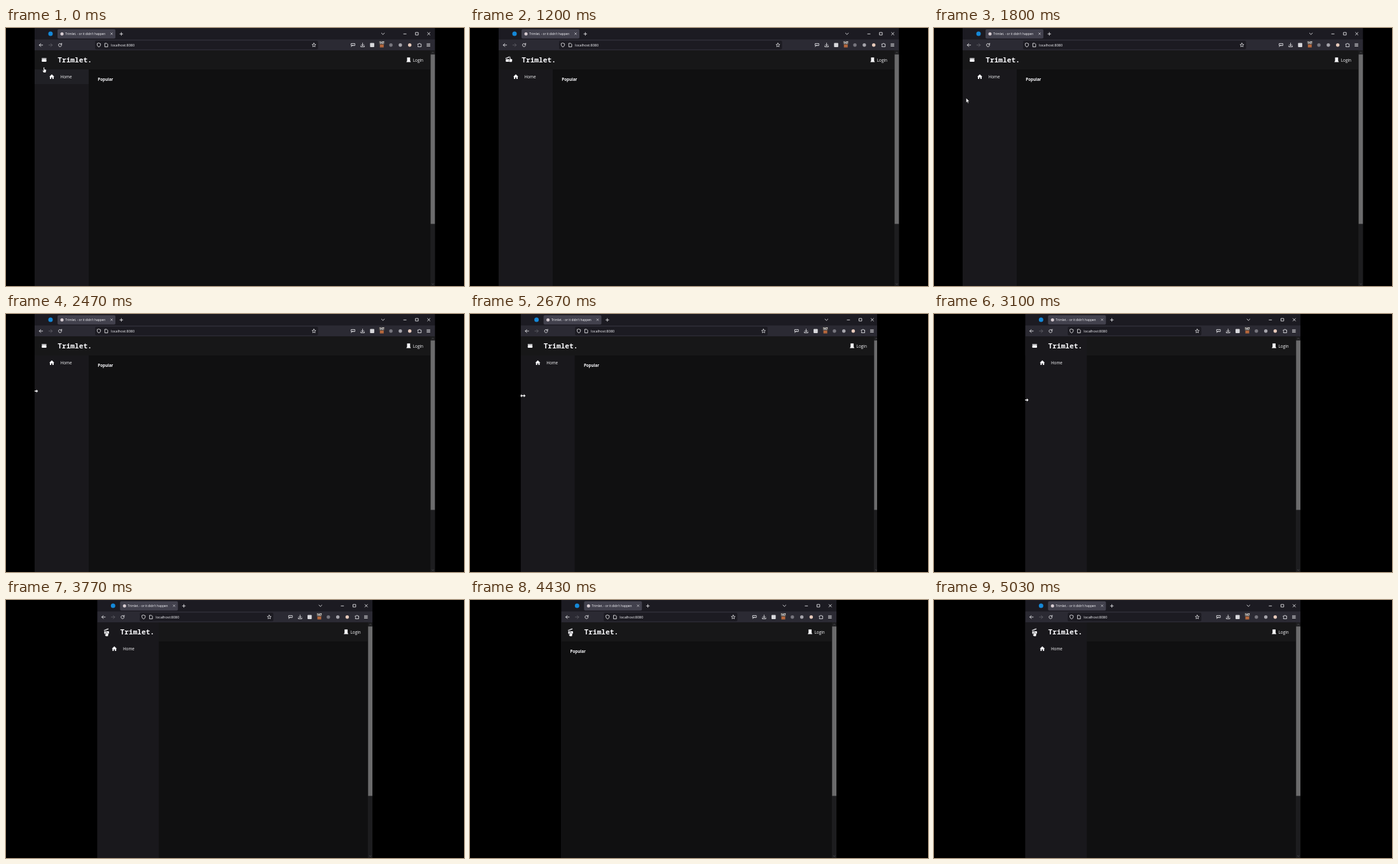
An HTML page with a canvas for the animation above (5.06 s loop, 720x405 px).

```html
<!DOCTYPE html>
<html lang="en">
<head>
<meta charset="utf-8">
<title>Sidebar demo</title>
<style>
  html, body { margin: 0; width: 100%; height: 100%; overflow: hidden; background: #000; }
  canvas { display: block; }
</style>
</head>
<body>
<canvas id="stage" width="720" height="405"></canvas>
<script>
const c = document.getElementById('stage').getContext('2d');
const LOOP = 5060, NAME = 'Trimlet.';
const SANS = '"Open Sans", "Noto Sans", sans-serif';
const MONO = '"Noto Sans Mono", "DejaVu Sans Mono", monospace';
const WHITE = '#fbfbfe';

// Progress 0..1 between two times, and a rise followed by a fall
const ramp = (t, from, to) => Math.min(1, Math.max(0, (t - from) / (to - from)));
const ease = (t, from, to) => { const p = ramp(t, from, to); return p * p * (3 - 2 * p); };
const pulse = (t, up, down, length) => ease(t, up, up + length) - ease(t, down, down + length);

function rect(x, y, w, h, fill, r = 0) {
  c.fillStyle = fill;
  c.beginPath();
  c.roundRect(x, y, w, h, r);
  c.fill();
}
function dot(x, y, r, fill) {
  rect(x - r, y - r, 2 * r, 2 * r, fill, r);
}
function text(s, x, y, size, weight = 400, family = SANS) {
  c.font = `${weight} ${size}px ${family}`;
  c.fillStyle = WHITE;
  c.fillText(s, x, y);
}
// SVG path placed at x, y; filled as well when fill is set
function icon(d, x, y, { stroke = WHITE, width = .8, fill, scale = 1 } = {}) {
  c.save();
  c.translate(x, y);
  c.scale(scale, Math.abs(scale));
  const p = new Path2D(d);
  if (fill) { c.fillStyle = fill; c.fill(p); }
  if (stroke) {
    c.strokeStyle = stroke;
    c.lineWidth = width;
    c.lineCap = c.lineJoin = 'round';
    c.stroke(p);
  }
  c.restore();
}
const ARROW = 'M2.7 0H-2.7M-.3-2.4L-2.7 0L-.3 2.4';
const CROSS = 'M-2-2L2 2M2-2L-2 2';
const CHEVRON = 'M-2.3-1L0 1.2L2.3-1';
const STAR = 'M' + Array.from({ length: 10 }, (_, i) => {
  const a = i * Math.PI / 5, r = i % 2 ? 1.5 : 3.2;
  return `${r * Math.sin(a)} ${-r * Math.cos(a)}`;
}).join('L') + 'Z';

function browser(L, R) {
  const W = R - L;
  rect(L, 0, W, 18, '#1c1b22');
  rect(L, 18, W, 17, '#2b2a33');

  dot(L + 25, 9, 3.5, '#1488d8');
  rect(L + 36, 2, 91, 14.5, '#42414d', 2);
  dot(L + 43, 9.2, 2.5, '#d8cdd2');
  text(NAME + " - or it didn't happen", L + 48.3, 11, 4.85);
  icon(CROSS, L + 121, 9, { scale: .7 });
  icon('M-2.3 0H2.3M0-2.3V2.3', L + 136.3, 9.3);
  icon(CHEVRON, R - 82, 9);
  icon('M-2 0H2', R - 47.5, 9.3);
  icon('M-2-2H2V2H-2Z', R - 28.5, 9);
  icon(CROSS, R - 10, 9);

  icon(ARROW, L + 10, 26.8);
  icon(ARROW, L + 25, 26.8, { stroke: '#66656d', scale: -1 });
  icon('M2.2-1.2A2.5 2.5 0 1 0 2.5.4M2.6-2.8V-.9H.7', L + 40, 26.8);

  // The address bar keeps flexible gaps on both sides
  const gap = (W - 629.5) * .1425;
  const a = L + 95 + gap, b = R - 184 - gap;
  rect(a, 20, b - a, 13.5, '#1c1b22', 2);
  icon('M0-3L2.6-2V0Q2.3 2.2 0 3.1Q-2.3 2.2-2.6 0V-2Z', a + 6, 26.7);
  icon('M-2-2.8H.6L2.2-1.2V2.8H-2Z', a + 17.7, 26.8);
  text('localhost:8080', a + 25, 28.8, 5.5);
  icon(STAR, b - 6.5, 26.9, { width: .7 });

  icon('M-2.6-2.2H2.8V1H-2.6ZM-3 2.6L0-.2', R - 129, 26.6);
  icon('M0-3V1.2M-1.9-.5L0 1.4L1.9-.5M-2.8 1.4V2.9H2.8V1.4', R - 114, 26.6);
  rect(R - 102.3, 23.5, 6.6, 6.6, '#d8d8dc', 1);
  rect(R - 86.8, 25.5, 6, 5, '#b5673c');
  rect(R - 88.2, 20.5, 8.8, 5.3, '#4b4745', .8);
  text('147', R - 87.5, 24.8, 4.3, 700);
  ['#77767e', '#a5a4ab', '#e6c9ba'].forEach((fill, i) => dot(R - 69.5 + 14.8 * i, 26.8, 2.7, fill));
  icon('M-2.5-1.5H-1A1 1 0 0 1 1-1.5H2.6V2.8H-2.5V1.3A.8.8 0 0 0-2.5-.1Z', R - 24.5, 26.6);
  for (const y of [-1.9, 0, 1.9]) icon('M-2.4 0H2.4', R - 10.5, 26.7 + y);
}

function clapper(x, y, open) {
  rect(x - 3.7, y - .9, 7.4, 3.9, WHITE, .8);
  c.save();
  c.translate(x - 3.6, y - 1.2);
  c.rotate(-.38 * open);
  rect(0, -1.8, 7.3, 1.7, WHITE, .5);
  for (let i = 0; i < 3; i++) icon('M.6 0L0 1.5', 1.4 + 2.2 * i, -1.7, { stroke: '#19181c', width: .5 });
  c.restore();
}

function page(t, L, R, onIcon, onHome) {
  const W = R - L;
  // A narrow window turns the sidebar into an overlay that slides away
  const overlay = t >= 2755;
  const hidden = overlay ? pulse(t, 3880, 4420, 250) : pulse(t, 270, 680, 210);
  const drop = overlay ? 14 * (1 - ramp(t, 2755, 2905)) : 0;
  const side = overlay ? 97 : 85 - 55 * hidden;
  const slide = overlay ? -97 * hidden : 0;
  const top = overlay ? 35 : 65;

  rect(L, 35, W, 370, '#101011');
  rect(L, 35, W, 30, '#171718');
  text('Popular', L + 14.3 + (overlay ? 0 : side), 82.5, 6.2, 700);
  rect(L + slide, top, side, 405 - top, '#19181c');
  if (onHome) rect(L, 65, side, 23, '#202025');

  const homeX = L + slide + 27 - (overlay ? 0 : 11 * hidden);
  icon('M-4 .1L0-3.7L4 .1H2.9V3.6H.9V1.1H-.9V3.6H-2.9V.1Z', homeX, 76.4 + drop, { stroke: null, fill: WHITE });
  c.globalAlpha = overlay ? 1 : 1 - hidden;
  text('Home', homeX + 13.6, 79.3 + drop, 6.35);
  c.globalAlpha = 1;

  clapper(L + 14.9, 50 + drop, onIcon);
  text(NAME, L + 36.2, 54 + drop, 11.2, 700, MONO);

  icon('M-2.4-3.7H2.4V1.4L3.6 3.5H-3.6L-2.4 1.4Z', R - 41.7, 50, { stroke: null, fill: WHITE });
  text('Login', R - 34.8, 52.8, 6.4);

  rect(R - 7.5, 35, 7.5, 370, '#1d1d1f');
  rect(R - 7, 41.5, 6.8, 266, '#6b6b6c');
  c.save();
  c.translate(R - 3.6, 38.5);
  c.scale(1, -1);
  icon(CHEVRON, 0, 0, { stroke: '#77777a', scale: .6 });
  c.restore();
  icon(CHEVRON, R - 3.6, 402, { stroke: '#77777a', scale: .6 });
}

const HAND = 'M-.8.6Q0-.4.8.6V3.2L3 3.7Q3.7 4 3.6 4.9L3 8.6H-.8L-2.4 5.6Q-2.3 4.6-.8 5.4Z';
const POINTER = 'M0 0V7.2L1.7 5.7L2.8 8.2L4 7.7L2.9 5.2H5.1Z';
const RESIZE = 'M-4.5 0L-1.5-3V-1H1.5V-3L4.5 0L1.5 3V1H-1.5V3Z';

function draw(t) {
  const L = 45 + 98.3 * ramp(t, 2495, 2995), R = 719.6 - L;
  // The page and the cursor trail the window edges while they are dragged
  const lag = 2.4 * pulse(t, 2500, 2900, 100);

  // Cursor, from the icon down to the window edge and back
  const away = ramp(t, 1250, 1600), edge = ease(t, 1600, 2100), back = ease(t, 3250, 3650);
  const x = L + 14.7 + 3.3 * ramp(t, 0, 1100) - 10 * away - 7 * edge + 13.2 * back + lag;
  const y = 61.5 - 16.5 * ease(t, 0, 300) + 59 * away + 17 * edge
    + 14 * ramp(t, 2495, 2830) - 86.5 * back;
  const resizing = x < L + 5 && t > 1800;
  const onHome = y > 57 && y < 82 && t < 2000;
  const onIcon = ease(t, 120, 270) - ease(t, 1290, 1420) + ease(t, 3580, 3720);

  c.fillStyle = '#000';
  c.fillRect(0, 0, 720, 405);
  c.save();
  c.beginPath();
  c.rect(L, 0, R - L, 405);
  c.clip();
  browser(L, R + lag);
  page(t, L, R + lag, onIcon, onHome);
  const shape = resizing ? RESIZE : onHome || onIcon > .5 ? HAND : POINTER;
  icon(shape, x, y, { stroke: '#111', width: .5, fill: WHITE });
  c.restore();
}

const start = performance.now();
function tick() {
  draw((performance.now() - start) % LOOP);
  requestAnimationFrame(tick);
}
tick();
</script>
</body>
</html>
```
